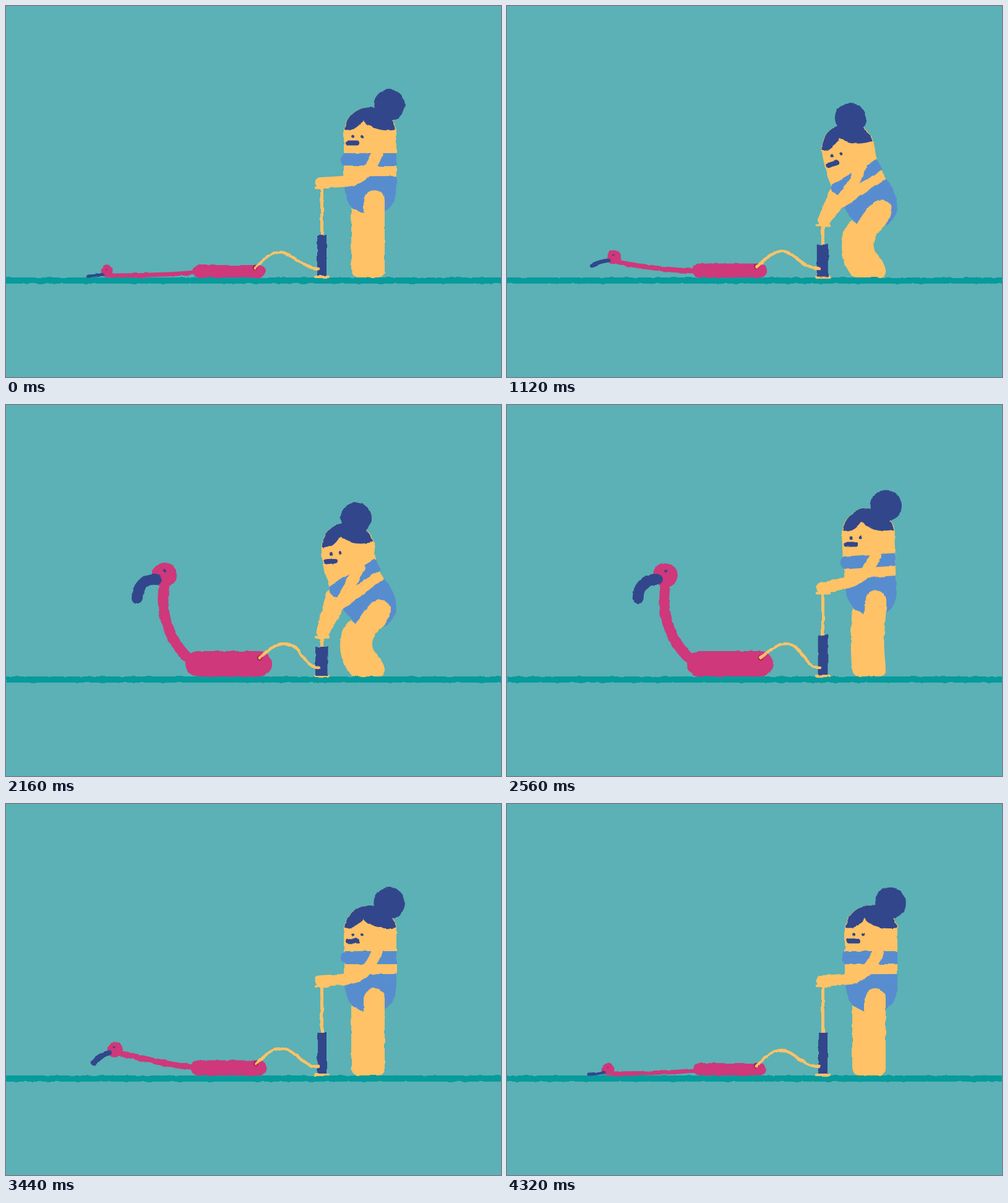
An HTML page for the animation above (4.36 s loop, 800 by 600 pixels).

```html
<!DOCTYPE html>
<html lang="en">
<head>
<meta charset="utf-8">
<title>Inflating a flamingo</title>
<style>
html, body { margin: 0; height: 100%; overflow: hidden; background: #5bb1b5; }
svg { display: block; width: 100vw; height: 100vh; }
path { stroke-linecap: round; stroke-linejoin: round; }
</style>
</head>
<body>
<svg viewBox="0 0 800 600">
  <filter id="boil" filterUnits="userSpaceOnUse" x="0" y="0" width="800" height="600" color-interpolation-filters="sRGB">
    <feTurbulence type="fractalNoise" baseFrequency=".08" numOctaves="2" result="noise"/>
    <feDisplacementMap in="SourceGraphic" in2="noise" scale="4" xChannelSelector="R" yChannelSelector="G"/>
  </filter>
  <g id="scene" filter="url(#boil)">
    <path d="M-20 444H820" stroke="#079b9c" stroke-width="10"/>
  </g>
</svg>
<script>
const LOOP = 4360, STEP = 80;
const SKIN = '#ffc266', NAVY = '#32468c', BLUE = '#578dcf', PINK = '#cf387b', WINE = '#a32a55';
const scene = document.getElementById('scene');
const noise = document.querySelector('feTurbulence');

// Easing
const linear = u => u;
const smooth = u => u * u * (3 - 2 * u);
const out = u => 1 - (1 - u) ** 3;
const back = u => 1 + 2.2 * (u - 1) ** 3 + 1.2 * (u - 1) ** 2;

// Poses: woman 0 stand, 1 bend, 2 push; bird 0 flat, 1 rising, 2 peak, 3 rest, 4 sag, 5 falling.
// Keys: [time, pose, easing towards it]
const tracks = {
  woman: [[0, 0], [160, 0], [560, 1, smooth], [1040, 1], [1360, 2, back],
          [2280, 2], [2640, 0, smooth], [LOOP, 0]],
  bird: [[0, 0], [1080, 0], [1240, 1, linear], [1480, 2, out], [1520, 2], [1920, 3, smooth],
         [2520, 3], [3040, 4, smooth], [3360, 5, linear], [3760, 0, out], [LOOP, 0]]
};

// Each pose reads "width path"; width 0 means a filled shape.
const parts = [];
function part(track, color, poses, parent = scene) {
  const el = document.createElementNS('http://www.w3.org/2000/svg', 'path');
  parent.append(el);
  parts.push({ track, color, poses, el });
}
const same = pose => [pose, pose, pose];

part('bird', PINK, [
  '20 M311,429H409', '30 M311,424H409', '41 M310.5,418.5H409.5',
  '41 M310.5,418.5H409.5', '37 M310,420.5H410.5', '29 M311,424.5H409']);
part('bird', PINK, [
  '7 M303,431 C260,435 215,436 170,436',
  '12 M300,421 C266,405 222,378 205,350',
  '17 M296,407 C266,370 262,325 273,282',
  '17 M295,410 C262,379 247,330 257,286',
  '17 M298,412 C262,383 244,340 244,296',
  '12 M300,421 C262,412 214,382 195,372']);
part('bird', PINK, [
  '20 M163.5,429h0', '30 M201,338h0', '40 M279,271h0',
  '40 M256,275h0', '38 M242,282h0', '29 M188,367h0']);
part('bird', NAVY, [
  '2 M163,426h0', '4 M201,333h0', '6 M281,265h0',
  '5 M257,268h0', '5 M242,276h0', '4 M187,362h0']);
part('bird', NAVY, [
  '5 M157,434 C148,436 140,437 132,437',
  '12 M190,343 C174,341 160,350 153,368',
  '18 M264,272 C246,264 230,268 221,282',
  '18 M243,282 C224,280 212,295 212,312',
  '16 M231,289 C214,289 202,303 202,319',
  '11 M178,372 C163,374 153,386 151,402']);
part('bird', WINE, [
  '9 M403,423h0', '9 M406,416h0', '9 M410,409h0',
  '9 M410,409h0', '9 M409,411h0', '9 M406,417h0']);

// Pump
part('woman', SKIN, same('4 M500,438H521'));
part('woman', SKIN, ['5 M510.5,294V380', '5 M510.5,294V380', '5 M510.5,376V400']);
part('woman', NAVY, [
  '0 M503,370H518V436H503Z', '0 M503,370H518V436H503Z', '0 M500,391H520.5V438H500Z']);
const fullHose = '4.5 M410,409 C425,396 437,386 451,386 C478,387 480,424 505,425';
const halfHose = '4.5 M406,417 C421,402 433,392 447,392 C470,393 478,424 505,425';
part('bird', SKIN, [
  '4.5 M403,424 C418,408 430,398 444,398 C464,399 476,424 505,425',
  halfHose, fullHose, fullHose,
  '4.5 M409,411 C425,397 437,388 451,388 C477,389 480,424 505,425', halfHose]);

// Torso, swimsuit bottom, legs
part('woman', SKIN, [
  '0 M546,200 C546,225 546,250 546,277 L631,277 C631,250 631,225 631,200Z',
  '0 M508,244 C519,267 531,290 542,313 L618,278 C607,255 596,232 585,208Z',
  '0 M510,232 C510,266 521,300 546,332 L612,283 C602,265 596,255 595,222Z']);
part('woman', BLUE, [
  '0 M546,275.5 L631,275 C631,305 630,322 612,332 L578,336 C556,330 546,312 546,275.5Z',
  '0 M542,312 L618,276 C634,303 637,335 610,349 L567,348 C558,338 550,328 542,312Z',
  '0 M545,330 L611,281 C638,312 636,345 611,357 L565,354 C558,347 552,340 545,330Z']);
part('woman', SKIN, [
  '0 M558,326 C558,350 558,365 558,385 C558,400 558,415 558,425 C558,434 563,439 570,439 L600,439 C607,439 612,435 612,428 C612,415 612,400 612,385 C612,360 612,335 612,315 C612,304 604,298 595,298 C586,298 578,305 578,316 C578,325 578,330 578,336Z',
  '0 M557,341 C546,354 540,368 540,386 C540,404 546,420 555,433 C558,438 563,439 568,439 L603,439 C609,439 613,434 612,427 C610,410 593,400 593,385 C594,362 621,348 621,326 C621,314 611,308 601,309 C590,311 583,320 577,330 C573,337 570,343 567,348Z',
  '0 M557,348 C546,358 540,371 540,389 C540,406 546,421 555,433 C558,438 563,439 568,439 L603,439 C609,439 613,434 612,427 C610,410 592,402 592,386 C593,366 622,352 622,332 C622,320 612,314 603,315 C593,317 586,324 579,333 C574,340 569,347 565,354Z']);

// Head, drawn upright and placed by its own transform
const head = document.createElementNS('http://www.w3.org/2000/svg', 'g');
scene.append(head);
const headPoses = [
  'translate(588.5 201) rotate(0) translate(-588.5 -201)',
  'translate(546 226) rotate(-25) translate(-588.5 -201)',
  'translate(552 227) rotate(-7) translate(-588.5 -201)'];
part('woman', SKIN, same('0 M546,216 L546,200 C549,178 568,164 588,164 C608,164 629,180 631,200 L631,216Z'), head);
part('woman', NAVY, same('0 M547,200 C550,178 568,164 588,164 C608,164 627,180 630,200 C610,204 588,198 578,185 C572,194 562,203 547,200Z'), head);
part('woman', NAVY, ['50.5 M619.5,160h0', '50.5 M586,154.5h0', '50.5 M607.5,159h0'], head);
part('woman', NAVY, same('5 M560.5,211h0'), head);
part('woman', NAVY, same('5 M575.5,211h0'), head);
part('woman', NAVY, ['8 M553,221.5 L568,221.5', '8 M554.5,231.5 L568,224', '8 M550.5,223 L565.5,223.5'], head);

// Far arm, swimsuit top, near arm, hand, handle
part('woman', SKIN, ['15 M545,284 L510,286', '15 M538,290 L511,288', '17 M526,306 L510,367']);
part('woman', BLUE, [
  '0 M549,238 L631,238 L631,259 L549,259 C538,258 538,239 549,238Z',
  '0 M526,278 L602,242 L611,262 L540,290 C530,290 525,285 526,278Z',
  '0 M525,292 L596,249 L606,266 L536,311 C526,311 519,300 525,292Z']);
part('woman', SKIN, [
  '18 M600,238 C588,272 568,283 542,284 L510,286',
  '18 M574,252 C577,280 555,290 540,291 L512,288',
  '18 M571,262 C561,283 547,308 537,326 L514,366']);
part('woman', SKIN, ['17 M508,285.5 L515,286', '18 M508,287.5 L516,288', '14 M510,368 L515,368']);
part('woman', SKIN, ['4.5 M501,294 L521,294', '4.5 M500,294.5 L521,294.5', '4.5 M501,375.5 L521,375.5']);

// Blend two strings number by number
function mix(a, b, u) {
  const target = b.match(/-?[\d.]+/g);
  let i = 0;
  return a.replace(/-?[\d.]+/g, n => (+n + (target[i++] - n) * u).toFixed(2));
}

function blendAt(keys, t) {
  const i = keys.findIndex(key => key[0] > t);
  const [t0, from] = keys[i - 1], [t1, to, ease = linear] = keys[i];
  const u = ease((t - t0) / (t1 - t0));
  return poses => mix(poses[from], poses[to], u);
}

function draw(step) {
  const t = step * STEP;
  const blend = { woman: blendAt(tracks.woman, t), bird: blendAt(tracks.bird, t) };
  for (const { track, color, poses, el } of parts) {
    const [width, ...path] = blend[track](poses).split(' ');
    const filled = +width === 0;
    el.setAttribute('d', path.join(' '));
    el.setAttribute('fill', filled ? color : 'none');
    el.setAttribute('stroke', filled ? 'none' : color);
    el.setAttribute('stroke-width', width);
  }
  head.setAttribute('transform', blend.woman(headPoses));
  noise.setAttribute('seed', step + 1);
}

let shown = -1;
function tick() {
  const step = Math.floor(performance.now() % LOOP / STEP);
  if (step !== shown) draw(shown = step);
  requestAnimationFrame(tick);
}
tick();
</script>
</body>
</html>
```
